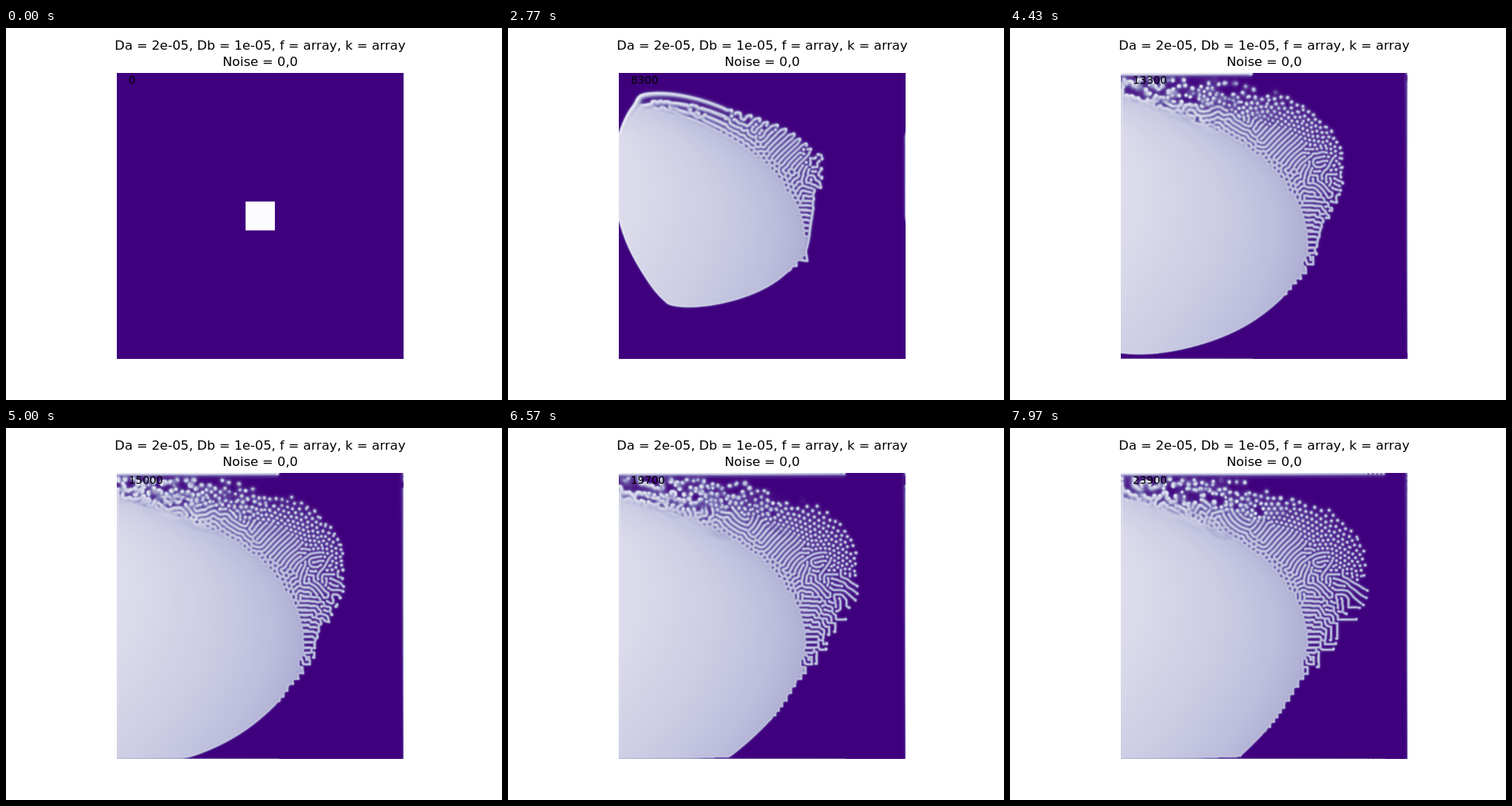
Animation, 640 px wide and 480 px high, one loop 8000 ms. Source, as an HTML page with a canvas:

```html
<!DOCTYPE html>
<html lang="en">
<head>
<meta charset="utf-8">
<title>Gray-Scott reaction-diffusion</title>
<style>
  html, body { margin: 0; width: 100%; height: 100%; overflow: hidden; background: #fff; }
  #stage { position: absolute; left: 0; top: 0; width: 640px; height: 480px; }
  canvas { position: absolute; left: 143px; top: 58px; width: 370px; height: 369px; }
  svg { position: absolute; left: 0; top: 0; }
  text { font-family: "DejaVu Sans", sans-serif; fill: #000; }
  .title { font-size: 16.67px; text-anchor: middle; }
  .count { font-size: 13.89px; }
</style>
</head>
<body>
<div id="stage">
  <canvas id="field" width="512" height="512"></canvas>
  <svg width="640" height="480" viewBox="0 0 640 480">
    <text class="title" x="328" y="28">Da = 2e-05, Db = 1e-05, f = array, k = array</text>
    <text class="title" x="328" y="49">Noise = 0,0</text>
    <text class="count" id="count" x="158.5" y="72">0</text>
  </svg>
</div>
<script>
const N = 512, MASK = N - 1, TILE = 16, TILES = N / TILE;
const LOOP = 8000, FRAMES = 240, STEPS = 100, DT = 2;
const DX = 0.0164, DA = DT * 2e-5 / DX ** 2, DB = DT * 1e-5 / DX ** 2;
const QUIET = 4e-6;

// Feed rate grows downwards, kill rate grows to the right.
const feed = Float64Array.from({ length: N }, (_, y) => 0.01 + 0.09 * y / MASK);
const kill = Float64Array.from({ length: N }, (_, x) => 0.045 + 0.025 * x / MASK);

let a = new Float64Array(N * N).fill(1), b = new Float64Array(N * N);
const half = 26;
for (let y = N / 2 - half; y < N / 2 + half; y++) {
  for (let x = N / 2 - half; x < N / 2 + half; x++) {
    a[y * N + x] = 0;
    b[y * N + x] = 1;
  }
}
let a2 = a.slice(), b2 = b.slice();

const corner = tile => (tile / TILES | 0) * TILE * N + tile % TILES * TILE;
const wrap = n => (n + TILES) % TILES;
let live = Array.from({ length: TILES * TILES }, (_, i) => i);

function isHot(tile) {
  const c = corner(tile);
  for (let y = 0; y < TILE; y++) {
    for (let p = c + y * N, end = p + TILE; p < end; p++) {
      if (Math.abs(a[p] - a2[p]) > QUIET || Math.abs(b[p] - b2[p]) > QUIET) return true;
    }
  }
  return false;
}

// Only tiles that change, and their neighbours, are worth updating.
function findLive() {
  const on = new Set();
  for (const tile of live.filter(isHot)) {
    const tx = tile % TILES, ty = tile / TILES | 0;
    for (let j = -1; j <= 1; j++) {
      for (let i = -1; i <= 1; i++) on.add(wrap(ty + j) * TILES + wrap(tx + i));
    }
  }
  live = [...on].sort((p, q) => p - q);
}

function updateTile(tile, a, b, a2, b2) {
  const x0 = tile % TILES * TILE, y0 = (tile / TILES | 0) * TILE;
  for (let y = y0; y < y0 + TILE; y++) {
    const row = y * N, up = ((y - 1) & MASK) * N, down = ((y + 1) & MASK) * N, f = feed[y];
    for (let x = x0; x < x0 + TILE; x++) {
      const p = row + x, l = row + ((x - 1) & MASK), r = row + ((x + 1) & MASK);
      const u = a[p], v = b[p], uvv = u * v * v;
      a2[p] = u + DA * (a[l] + a[r] + a[up + x] + a[down + x] - 4 * u) + DT * (f * (1 - u) - uvv);
      b2[p] = v + DB * (b[l] + b[r] + b[up + x] + b[down + x] - 4 * v) + DT * (uvv - (f + kill[x]) * v);
    }
  }
}

function step() {
  for (const tile of live) updateTile(tile, a, b, a2, b2);
  [a, a2] = [a2, a];
  [b, b2] = [b2, b];
}

// Snapshots are made on demand and kept for later loops.
const shots = [];
function snapshot(i) {
  while (shots.length <= i) {
    if (shots.length) {
      for (let n = 1; n <= STEPS / DT; n++) {
        step();
        if (n % 10 === 0) findLive();
      }
    }
    const shot = new Uint8ClampedArray(N * N);
    for (let p = 0; p < shot.length; p++) shot[p] = a[p] * 255;
    shots.push(shot);
  }
  return shots[i];
}

const stops = [
  0xfcfbfd, 0xefedf5, 0xdadaeb, 0xbcbddc, 0x9e9ac8, 0x807dba, 0x6a51a3, 0x54278f, 0x3f007d
].map(c => [c >> 16, c >> 8 & 255, c & 255]);
const palette = Uint32Array.from({ length: 256 }, (_, i) => {
  const s = i / 255 * 8, n = Math.min(7, Math.floor(s));
  const [r, g, bl] = stops[n].map((c, j) => Math.round(c + (stops[n + 1][j] - c) * (s - n)));
  return (255 << 24 | bl << 16 | g << 8 | r) >>> 0;
});

const ctx = document.getElementById("field").getContext("2d");
const count = document.getElementById("count");
const img = ctx.createImageData(N, N), px = new Uint32Array(img.data.buffer);
let shown = -1, start;

function draw(i) {
  if (i === shown) return;
  shown = i;
  const shot = snapshot(i);
  for (let p = 0; p < px.length; p++) px[p] = palette[shot[p]];
  ctx.putImageData(img, 0, 0);
  count.textContent = i * STEPS;
}

function tick(now) {
  start ??= now;
  const t = (now - start) % LOOP;
  draw(Math.min(FRAMES - 1, Math.floor((t + 4) * FRAMES / LOOP)));
  requestAnimationFrame(tick);
}
draw(0);
requestAnimationFrame(tick);
</script>
</body>
</html>
```
